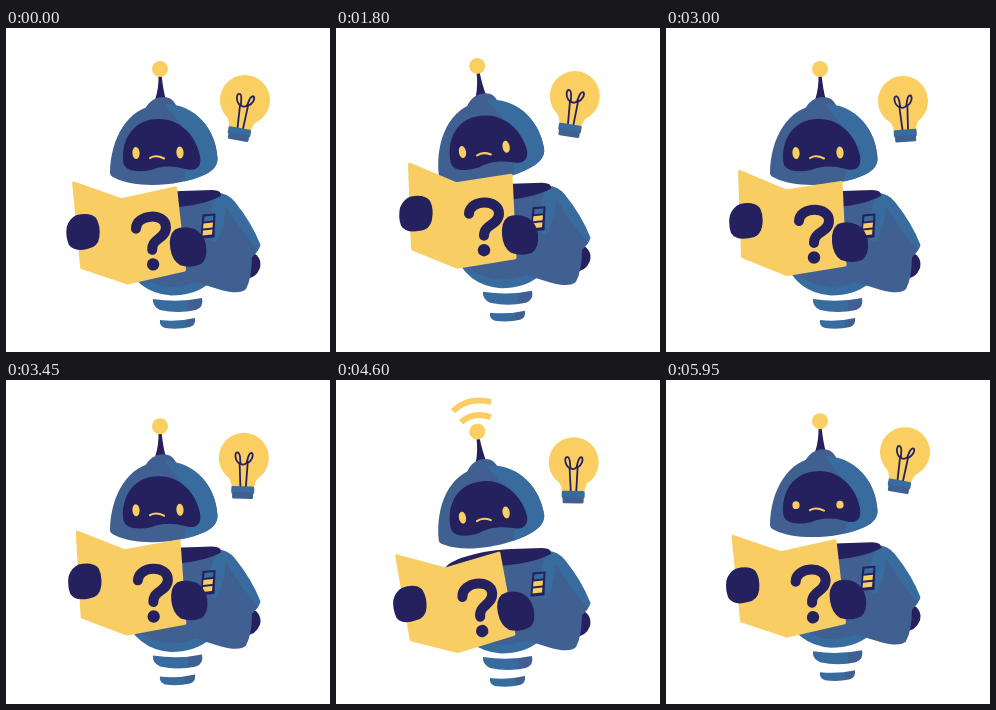
Animation, 324 px wide and 324 px high, one loop 6000 ms. Source, as an HTML page:

```html
<!DOCTYPE html>
<html lang="en">
<head>
<meta charset="utf-8">
<title>Puzzled robot</title>
<style>
html, body { margin: 0; width: 100%; height: 100%; overflow: hidden; background: #fff; }
svg { display: block; width: 100vw; height: 100vh; }
.shade { fill: #3f6090; }
.light { fill: #386c9f; }
.navy { fill: #25215f; }
.gold { fill: #fbce62; }
.page { fill: #f8cd64; stroke: #f8cd64; stroke-width: 3; stroke-linejoin: round; }
.line { fill: none; stroke: #25215f; stroke-linecap: round; stroke-linejoin: round; }
.wave { fill: none; stroke: #fbce62; stroke-width: 6; }
</style>
</head>
<body>
<svg viewBox="0 0 324 324">
  <linearGradient id="split">
    <stop offset=".7" stop-color="#386c9f"/>
    <stop offset=".7" stop-color="#3f6090"/>
  </linearGradient>

  <g id="bulb">
    <path class="gold" d="M-20 14 Q-12 20 -11 30 H11 Q12 20 20 14Z"/>
    <circle class="gold" r="25"/>
    <path class="line" stroke-width="1.800" d="M-2.500 29 L-4 6 C-9 3 -10 -6 -6 -5 C-3 -4 -4 3 -3 6 Q0 8 3 5 C4 0 5 -6 8 -5 C10 -3 8 3 4 5 L3 29"/>
    <rect class="light" x="-11.500" y="28.500" width="23" height="7.500" rx="1.500"/>
    <rect class="shade" x="-10.500" y="34.500" width="21" height="6.500" rx="1.500"/>
  </g>

  <g id="body">
    <path fill="url(#split)" d="M147 271 Q172 275 196 270 Q198 279 190 282 Q172 286 154 282 Q146 278 147 271Z"/>
    <path fill="url(#split)" d="M154 292 Q172 294 189 290 Q190 297 184 299 Q172 302 159 300 Q153 298 154 292Z"/>
    <path class="light" d="M110 182 Q160 164 214 168 L222 220 Q212 267.500 165 267.500 Q130 265 117 230Z"/>
    <path class="shade" d="M110 182 Q160 164 214 168 L222 220 Q205 258 165 259 Q135 257 117 230Z"/>
    <path class="navy" d="M242 222 Q257 228 254 240 Q250 251 238 251Z"/>
    <path class="light" d="M211 165 Q222 165 229 174 Q246 195 254.500 217 Q253 223 246 229 L200 232 Q198 200 211 165Z"/>
    <path class="shade" d="M220 178 Q218 204 208 216 L246 229 L252 222 Q236 205 220 178Z"/>
    <path class="shade" d="M190 206 L246 228 Q246 250 240 261 Q234 267 215 262 L186 253Z"/>
    <path class="navy" d="M109 182 C116 172 148 164 176 163 L206 162 Q216 162 215 168 Q196 178 160 180 Q130 183 109 186Z"/>
    <g transform="translate(-.5 1.500)">
      <path class="navy" d="M197 185 L210 184 L209 208 L195 209Z"/>
      <path class="light" d="M199 187 L208 186 L207.500 191 L198.500 192Z"/>
      <path class="gold" d="M198 194 L207.500 193 L207 198 L197.500 199Z M197.500 201 L207 200 L206.500 205 L197 206Z"/>
    </g>
  </g>

  <g id="head">
    <path id="inner" class="wave" d="M139 30 Q152 20 169 28"/>
    <path id="outer" class="wave" d="M132 18 Q148 5 171 13"/>
    <path class="navy" d="M152.500 46 H155.500 Q157 62 160 72 H149 Q153 60 152.500 46Z"/>
    <circle class="gold" cx="154" cy="41" r="8"/>
    <path class="shade" d="M139 81 C143 73 150 69 157 69 C165 69 168 73 171 79Z"/>
    <path class="shade" d="M104 145 C104.500 110 122 79 152 77 C188 74 210 100 211.500 130 C212 137 207 143 198 147 C175 158 130 161 109 150 Q104 148 104 145Z"/>
    <path class="light" d="M159 76 C190 76 210 102 211.500 130 C212 137 207 143 198 147 Q189 151 178 153.500 L187 112Z"/>
    <path class="navy" d="M117 132 C116 108 130 91 152 91 C172 90 190 106 194 128 C196 139 190 144 180 141 C165 137 155 138 145 142 C130 145 117 143 117 132Z"/>
    <ellipse class="gold eye" cx="130" cy="125" rx="3.600" transform="rotate(-4 130 125)"/>
    <ellipse class="gold eye" cx="174" cy="124.500" rx="3.600" transform="rotate(-4 174 125)"/>
    <path class="wave" style="stroke-width:2; stroke-linecap:round" d="M144 130 Q150 126.500 158 130.500"/>
  </g>

  <g id="book">
    <path class="page" d="M73.500 143.500 L120 163 L175 154.500 L179 237 L121 246.500 L76.500 228.500Z"/>
    <path class="line" stroke-width="10" d="M133 193 C134 178 163.500 178 163 193 C162.500 205 148 203 148 215"/>
    <circle class="navy" cx="148" cy="229.500" r="6.200"/>
    <path class="navy" transform="translate(80 193)" d="M-6 -17 Q8 -20 14 -13 Q18 -5 16 6 Q14 16 4 17 Q-10 20 -15 12 Q-18 3 -16 -6 Q-13 -14 -6 -17Z"/>
    <path class="navy" transform="translate(184 214)" d="M-12 -18 Q-3 -22 8 -17 Q17 -11 18 0 Q19 13 12 18 Q2 22 -9 18 Q-17 13 -18 0 Q-19 -13 -12 -18Z"/>
  </g>
</svg>
<script>
const LOOP = 6000, STEP = 50;
const $ = id => document.getElementById(id);
const place = (id, value) => $(id).setAttribute("transform", value);
const clamp = x => Math.max(0, Math.min(1, x));
const ramp = (t, a, b) => { const k = clamp((t - a) / (b - a)); return k * k * (3 - 2 * k); };
const eyes = document.querySelectorAll(".eye");

// How far the book is raised, counted from its lowest point
function raised(t) {
  const u = (t + 850) % LOOP;
  const dip = ramp(u, 1800, 2175) - ramp(u, 2175, 2550);
  return ramp(u, 0, 1550) - ramp(u, 3850, 5650) - .4 * dip;
}

function draw(t) {
  const angle = 2 * Math.PI * t / LOOP;
  const pulse = t % 2000, half = t % 3000;
  const bob = -6.5 * Math.sin(angle) + 1.9 * Math.sin(2 * angle);
  const sway = bob + 3.6 * Math.sin(angle) ** 2;

  const rock = (1 + Math.cos(3 * angle)) / 2;
  place("bulb", `translate(${237 + 2 * rock} ${73 - rock + sway}) rotate(${-4 + 14 * rock})`);

  place("body", `translate(0 ${bob})`);
  const drop = 1 - raised(t);
  place("book", `translate(${-drop} ${bob + 11.5 * drop}) rotate(${-8 * drop} 180 238)`);

  const tilt = ramp(half, 810, 910) - ramp(half, 2030, 2140);
  place("head", `translate(${-tilt} ${sway}) rotate(${-6.2 * tilt} 157 150)`);

  // The eyes blink around each change of pose
  const away = Math.min(...[835, 2100, 2900].map(c => Math.abs(half - c)));
  const open = clamp((away - 20) / 50);
  eyes.forEach(e => e.setAttribute("ry", .7 + 5.3 * open));

  const show = (id, from) => $(id).style.display = pulse >= from && pulse < 950 ? "" : "none";
  show("inner", 350);
  show("outer", 500);
}

function frame() {
  draw(Math.floor(performance.now() / STEP) * STEP % LOOP);
  requestAnimationFrame(frame);
}
frame();
</script>
</body>
</html>
```
